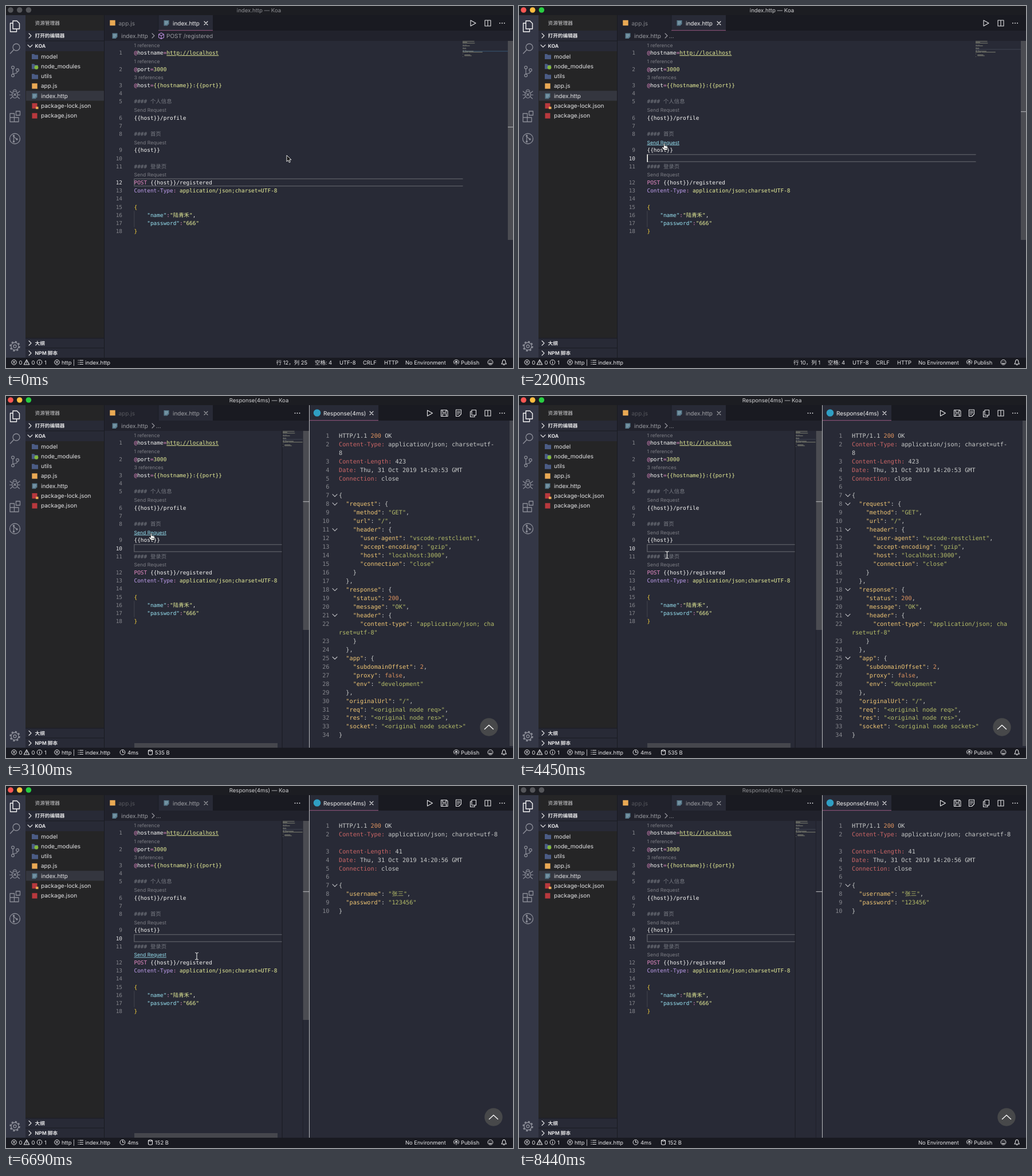
Animation of 885x633 px, one loop 8540 ms. Source, as an HTML page:

```html
<!DOCTYPE html>
<html lang="zh">
<head>
<meta charset="utf-8">
<title>REST request demo</title>
<style>
html, body { margin: 0; width: 100%; height: 100%; overflow: hidden; background: #282a36; }
svg { display: block; width: 100%; height: 100%; }
text { white-space: pre; text-rendering: geometricPrecision; font-family: Inter, "Noto Sans CJK SC", "Noto Sans CJK", sans-serif; }
.code { font-family: "DejaVu Sans Mono", "Noto Sans CJK SC", "Noto Sans CJK", monospace; }
.link { text-decoration: underline; }
.line { fill: none; stroke-width: 1.1; stroke-linejoin: round; stroke-linecap: round; }
</style>
</head>
<body>
<svg id="stage" viewBox="0 0 885 633" preserveAspectRatio="none"></svg>
<script>
const LOOP = 8540;
const SOLO = '0-2650', SPLIT = '2650-8540';
const BG = '#282a36', DARK = '#191a21', SIDE = '#252526', CRUMB = '#21222c', DIM = '#85868c', LIGHT = '#e4e4e6';
const INK = {
  w: '#f6f6f4', p: '#e58bc4', y: '#e7ee98', u: '#e7ee98', v: '#bf9eee', c: '#97e1f1', k: '#777a82', b: '#f7d13d',
  t: '#c9cbca', a: '#f0c674', s: '#b5bd68', n: '#de935f', h: '#cc6666'
};

const esc = s => s.replace(/&/g, '&amp;').replace(/</g, '&lt;').replace(/>/g, '&gt;');
const rect = (x, y, w, h, fill, more = '') => `<rect x="${x}" y="${y}" width="${w}" height="${h}" fill="${fill}" ${more}/>`;
const disc = (x, y, r, fill) => `<circle cx="${x}" cy="${y}" r="${r}" fill="${fill}"/>`;
const line = (d, color = LIGHT, w = 1.1) => `<path class="line" d="${d}" stroke="${color}" style="stroke-width:${w}"/>`;
const ring = (x, y, r, color = LIGHT, w = 1) => `<circle cx="${x}" cy="${y}" r="${r}" fill="none" stroke="${color}" stroke-width="${w}"/>`;
const text = (x, y, s, fill = LIGHT, size = 10, more = '') =>
  `<text x="${x}" y="${y}" fill="${fill}" font-size="${size}" ${more}>${esc(s)}</text>`;
// Shown only inside the given time ranges, e.g. "0-300 8440-8540".
const on = (ranges, s) => `<g data-on="${ranges}">${s}</g>`;

// "~p@~whost" becomes coloured spans.
function code(x, y, s, size) {
  const parts = s.split(/~(\w)/);
  let spans = '';
  for (let i = 1; i < parts.length; i += 2)
    spans += `<tspan fill="${INK[parts[i]]}"${parts[i] === 'u' ? ' class="link"' : ''}>${esc(parts[i + 1])}</tspan>`;
  return `<text class="code" x="${x}" y="${y}" font-size="${size}">${spans}</text>`;
}
const number = (x, y, n, size, fill = DIM) =>
  `<text class="code" x="${x}" y="${y}" font-size="${size}" text-anchor="end" fill="${fill}">${n}</text>`;

// --- small icons ---
const right = (x, y, c = LIGHT) => line(`M${x - 2} ${y - 4}l4 4l-4 4`, c);
const down = (x, y, c = LIGHT) => line(`M${x - 4} ${y - 2}l4 4l4-4`, c);
const cross = (x, y, c = LIGHT, r = 3) => line(`M${x - r} ${y - r}l${2 * r} ${2 * r}m0-${2 * r}l-${2 * r} ${2 * r}`, c);
const dots = (x, y) => [-4, 0, 4].map(d => disc(x + d, y, 0.9, LIGHT)).join('');
const play = x => line(`M${x - 4} 25v10l9-5z`);
const columns = x => line(`M${x - 5} 25h10v10h-10zM${x} 25v10`);
const page = (x, y) => `<path d="M${x - 4.5} ${y - 4.5}h9v6.5l-3 3h-6z" fill="#587a8c"/>` +
  line(`M${x - 2.5} ${y - 2}h5m-5 2h5m-5 2h3`, '#a9c0ca', 0.7);
const folder = y => `<path d="M45 ${y - 4}h4l1.4 1.6h5.6v7.4h-11z" fill="#4b5c85"/>`;
const orange = (x, y) => rect(x - 4.7, y - 4.7, 9.4, 9.4, '#e9a954');
const red = y => rect(45.5, y - 4.7, 9, 9.4, '#b8383d');

function titleBar() {
  const title = (s, c) => text(441.5, 10.6, s, c, 9.6, 'text-anchor="middle"');
  const lights = colors => colors.map((c, i) => disc(8 + 15.7 * i, 7, 4.8, c)).join('');
  const grey = '#55565a', soft = '#8f9094';
  return rect(0, 0, 885, 16, '#1c1d22') +
    on('0-300 8440-8540', lights([grey, grey, grey])) +
    on('300-8440', lights(['#fc5753', '#fdbc40', '#28cd41'])) +
    on('0-300', title('index.http — Koa', soft)) +
    on('300-2650', title('index.http — Koa', '#d2d2d4')) +
    on('2650-8440', title('Response(4ms) — Koa', '#d2d2d4')) +
    on('8440-8540', title('Response(4ms) — Koa', soft));
}

function activityBar() {
  const c = '#8c8e98';
  return rect(0, 16, 34, 599, '#343746') +
    line('M12 26h7l4.500 4.500v9.500h-11.500zM12 30h-4.500v15h11v-5', '#f4f4f4', 1.4) +
    ring(18, 72, 6, c, 1.3) + line('M13.600 76.500L7.500 83', c, 1.5) +
    ring(12, 107.500, 2.4, c, 1.2) + ring(12, 121.500, 2.4, c, 1.2) + ring(20, 112, 2.4, c, 1.2) +
    line('M12 110v9M20 114.500q0 3.500-7 4', c, 1.2) +
    `<ellipse cx="15.500" cy="155" rx="4.800" ry="6" fill="none" stroke="${c}" stroke-width="1.200"/>` +
    line('M12 149q3.500-6 7 0M10.500 152l-3.500-3M10.500 155.500h-4M11 159l-3.500 3M20.500 152l3.500-3M20.500 155.500h4M20 159l3.500 3M13.500 153l4 4m0-4l-4 4', c, 1.1) +
    line('M7 188h7.500v14.500h-7.500zM7 195h15v7.500h-7.500M17.500 184h7v7h-7z', c, 1.3) +
    ring(15.500, 232, 9, c, 1.3) + line('M13.500 226v12M14 229l5 4', c, 1.2) +
    disc(13.500, 227, 1.8, c) + disc(13.500, 237, 1.8, c) + disc(19, 233, 1.8, c) +
    `<circle cx="15.500" cy="595" r="8" fill="none" stroke="${c}" stroke-width="2.400" stroke-dasharray="3.200 3.080"/>` +
    ring(15.500, 595, 6.500, c, 1.3) + ring(15.500, 595, 2.500, c, 1.3);
}

function sideBar() {
  const bold = (y, s) => text(50.500, y + 3.1, s, LIGHT, 8.66, 'font-weight="700"');
  const names = ['model', 'node_modules', 'utils', 'app.js', 'index.http', 'package-lock.json', 'package.json'];
  const row = i => 88 + 17.33 * i;
  return rect(34, 16, 137.500, 599, SIDE) +
    text(50.500, 33, '资源管理器', '#cfcfd2', 8.7) +
    rect(34, 43, 137.500, 36, BG) + rect(34, 60.500, 137.500, 1, DARK) +
    right(42, 52) + bold(52, '打开的编辑器') + down(42, 70) + bold(70, 'KOA') +
    on('0-2800 5500-8540', rect(35, 148.300, 136.500, 17.300, '#34363f')) +
    folder(row(0)) + folder(row(1)) + disc(53, row(1) + 2, 3.4, '#83b93c') + folder(row(2)) +
    orange(50, row(3)) + page(50, row(4)) + red(row(5)) + rect(52, row(5) + 1.500, 4.500, 4, '#e9a954') + red(row(6)) +
    names.map((s, i) => text(61, row(i) + 3.500, s)).join('') +
    rect(34, 580.500, 137.500, 35, BG) + rect(34, 580.500, 137.500, 1, DARK) + rect(34, 597.500, 137.500, 1, DARK) +
    right(42, 589.500) + bold(589.500, '大纲') + right(42, 607) + bold(607, 'NPM 脚本') +
    rect(171, 16, 1, 599, DARK);
}

function tabs() {
  const names = (a, b) => text(196.500, 33.500, 'app.js', a) + text(291, 33.500, 'index.http', b) + cross(349, 30, b);
  const pink = (x, w) => rect(x, 42.200, w, 1, '#96587f');
  return rect(172, 16, 713, 27, DARK) + rect(172, 43, 713, 18, CRUMB) +
    rect(172, 16, 94, 27, CRUMB) + rect(266, 16, 95, 27, BG) +
    rect(265.500, 16, 0.8, 27, DARK) + orange(186, 29.500) + page(280, 29.500) +
    on(SOLO, names('#85868b', '#f2f2f2') + pink(266, 95) + play(815) + columns(841) + dots(866, 30)) +
    on(SPLIT, names('#56575d', '#a1a2a6') + dots(508.500, 30)) +
    page(190, 52) + text(201, 55.500, 'index.http', '#9a9ba1') + right(257, 52, '#9a9ba1') +
    on('0-300', line('M271 47l4.500 2.500v5.500l-4.500 2.500l-4.500-2.500v-5.500zM266.500 49.500l4.500 2.500l4.500-2.500M271 52v5.500', '#b48ad6') +
      text(280, 55.500, 'POST /registered', '#9a9ba1')) +
    on('300-8540', text(262, 55.500, '...', '#9a9ba1'));
}

// --- request editor ---
const ROW = 14.175, SIZE = 9.45;
const source = [
  ['~p@~whostname~p=~uhttp://localhost', '1 reference'],
  ['~p@~wport~p=~y3000', '1 reference'],
  ['~p@~whost~p=~y{{hostname}}:{{port}}', '3 references'],
  [''],
  ['~k#### 个人信息'],
  ['~w{{host}}/profile', 'Send Request'],
  [''],
  ['~k#### 首页'],
  ['~w{{host}}', 'Send Request'],
  [''],
  ['~k#### 登录页'],
  ['~pPOST ~w{{host}}/registered', 'Send Request'],
  ['~vContent-Type~p: ~yapplication/json;charset=UTF-8'],
  [''],
  ['~b{'],
  ['~c    "name"~p:~y"陆青禾"~w,'],
  ['~c    "password"~p:~y"666"'],
  ['~b}']
];
const hover = { 9: [1900, 4000], 12: [4595, 6830] };

function minimap(x, width) {
  let out = '';
  source.forEach(([s], i) => {
    const plain = s.replace(/~\w/g, '');
    const color = s[1] === 'k' ? '#70737c' : '#b7b99c';
    for (const m of plain.matchAll(/\S+/g)) {
      const from = m.index * 0.79;
      if (from < width) out += rect(x + from, 61.300 + i * 1.575, Math.min(m[0].length * 0.79, width - from), 1, color, 'opacity=".6"');
    }
  });
  return out;
}

function editor() {
  const top = r => 60.700 + ROW * r;
  // The current-line frame stays open on the right.
  const current = (r, end) => line(`M${end} ${top(r) + 0.600}H223.800V${top(r) + ROW - 1.100}H${end}`, '#55575f', 1.5);
  const mark = (x, w, y) => rect(x, y, w, 1.3, '#a2a3a7');
  let out = rect(172, 61, 713, 554, BG), lines = '', r = 0;
  source.forEach(([s, lens], i) => {
    const n = i + 1;
    if (lens) {
      const y = top(r++) + 10.900, label = (c, k = '') => text(223.500, y, lens, c, 8.6, k);
      if (hover[n]) {
        const [a, b] = hover[n];
        lines += on(`0-${a} ${b}-${LOOP}`, label('#7d7e85')) + on(`${a}-${b}`, label(INK.c, 'class="link"'));
      } else lines += label('#7d7e85');
    }
    const y = top(r++) + 10.350;
    if (n === 12) lines += on('0-300', number(203, y, n, SIZE, LIGHT)) + on('300-8540', number(203, y, n, SIZE));
    else if (n === 10) lines += on('0-300', number(203, y, n, SIZE)) + on('300-8540', number(203, y, n, SIZE, LIGHT));
    else lines += number(203, y, n, SIZE);
    if (s) lines += code(223.500, y, s, SIZE);
  });
  out += on('0-300', current(17, 797)) + on('300-2650', current(14, 797)) + on(SPLIT, current(14, 482));
  out += rect(223.500, top(21), 0.8, 2 * ROW, '#484a55') + lines;
  out += on('300-880 1320-1762 2200-2650', rect(223.500, top(14) + 0.3, 1.5, 13.500, '#f8f8f2'));
  out += on(SOLO,
    on('0-300', rect(797, 78.500, 79, 1.2, '#35506b')) + on('300-2650', rect(797, 75.300, 79, 1.1, '#3d424f')) +
    minimap(797, 79) + rect(876, 61, 9, 348, '#4b4c52') +
    on('0-300', mark(876, 9, 211)) + on('300-2650', mark(876, 9, 184)));
  out += on(SPLIT,
    rect(482, 61, 47.500, 554, BG) + rect(481.600, 61, 1, 554, '#1a1b22') + rect(483, 75.300, 35, 1.1, '#3d424f') +
    minimap(483, 35) + rect(517.800, 61, 0.8, 554, '#1f2029') +
    on('2650-7570', rect(518.500, 61, 11, 348, '#4b4c52') + rect(224, 607, 250, 8, '#46474d')) +
    mark(518.500, 11, 184));
  return out;
}

// --- response pane; a leading ^ marks a wrapped row ---
const okLine = '~tHTTP/1.1 ~n200 ~tOK';
const head = (key, value) => `~h${key}:~t ${value}`;
const first = [
  okLine, head('Content-Type', 'application/json; charset=utf-'), '^~t8',
  head('Content-Length', '423'), head('Date', 'Thu, 31 Oct 2019 14:20:53 GMT'), head('Connection', 'close'), '',
  '{', '  "request": {', '    "method": "GET",', '    "url": "/",', '    "header": {',
  '      "user-agent": "vscode-restclient",', '      "accept-encoding": "gzip",',
  '      "host": "localhost:3000",', '      "connection": "close"', '    }', '  },',
  '  "response": {', '    "status": 200,', '    "message": "OK",', '    "header": {',
  '      "content-type": "application/json; cha', '^~srset=utf-8"', '    }', '  },',
  '  "app": {', '    "subdomainOffset": 2,', '    "proxy": false,', '    "env": "development"', '  },',
  '  "originalUrl": "/",', '  "req": "<original node req>",', '  "res": "<original node res>",',
  '  "socket": "<original node socket>"', '}'
];
const second = [
  okLine, head('Content-Type', 'application/json; charset=utf-8'), '^',
  head('Content-Length', '41'), head('Date', 'Thu, 31 Oct 2019 14:20:56 GMT'), head('Connection', 'close'), '',
  '{', '  "username": "张三",', '  "password": "123456"', '}'
];
const paint = s => s.includes('~') ? s : '~t' + s.replace(/"[^"]*"?|\bfalse\b|\b\d+\b/g, (m, at, all) =>
  `~${m[0] !== '"' ? 'n' : all[at + m.length] === ':' ? 'a' : 's'}${m}~t`);

function response(rows, buttonX) {
  let n = 0;
  return rows.map((s, i) => {
    const y = 72.700 + 14.963 * i, wrapped = s[0] === '^';
    if (wrapped) s = s.slice(1);
    return (wrapped ? '' : number(564.500, y, ++n, 10.24)) +
      (s.endsWith('{') ? down(574, y - 3.500, '#bfc0c4') : '') +
      (s ? code(581, y, paint(s), 10.24) : '');
  }).join('') + disc(buttonX, 579, 15.700, '#47484a') + line(`M${buttonX - 7.500} 582.500l7.500-7l7.500 7`, '#f4f4f4', 1.5);
}

function responsePane() {
  const note = x => line(`M${x - 4.500} 24h9v7.500l-4 4h-5zM${x - 2.500} 27h5m-5 2.500h5m-5 2.500h2.500`);
  return on(SPLIT,
    rect(530, 16, 355, 27, DARK) + rect(530, 43, 355, 572, BG) + rect(530, 16, 120, 27, BG) +
    rect(530, 42.200, 120, 1, '#96587f') + disc(543, 29.500, 6.3, '#2f9fc4') +
    text(554, 33.500, 'Response(4ms)', '#f2f2f2') + cross(638, 30) + play(739.500) +
    line('M759.500 24.500h9.500l2 2v9h-11.500zM762 24.500v4h6v-4M762 35.500v-4.500h6.500v4.500') + note(790) +
    line('M813 24.500h7.500v9h-7.500zM813 27h-2.500v9.500h7.500v-3') + columns(841) + dots(866, 30) +
    on('3100-5650', response(first, 843) + rect(879, 43, 6, 569, '#44464d')) +
    on('5650-8540', response(second, 851)) +
    rect(529, 16, 1, 599, '#b9babd'));
}

function statusBar() {
  const s = (x, str, more) => text(x, 626.500, str, '#e6e6e8', 9.4, more);
  const failed = x => ring(x, 623, 4.3) + cross(x, 623, LIGHT, 1.6);
  const full = s(539, '空格: 4') + s(582, 'UTF-8') + s(623, 'CRLF') + s(660, 'HTTP');
  const place = str => s(526, str, 'text-anchor="end"');
  return rect(0, 615, 885, 18, DARK) +
    failed(14) + s(22.500, '0') + line('M36 618.500l4.700 8.500h-9.400zM36 621.500v2.500m0 1.500v.1') + s(44.500, '0') +
    ring(58.500, 623, 4.3) + line('M58.500 622.500v2.500m0-4.500v.1') + s(67, '1') +
    failed(89) + s(97, 'http |') + line('M126 619.500h.5m2 0h6M126 623h.5m2 0h6M126 626.500h.5m2 0h6') + s(138, 'index.http') +
    on('0-300', place('行 12，列 25')) + on('300-2800', place('行 10，列 1')) + on('0-2800', full) +
    on('2800-8540', ring(203.500, 623, 4.4) + line('M203.500 620v3h2.500') + s(212, '4ms') +
      line('M248.500 620v6.500q3.500 2 7 0v-6.500M248.500 620q3.500 2 7 0q-3.500-2.500-7 0')) +
    on('2800-5500', s(260, '535 B')) + on('5500-8540', s(260, '152 B')) +
    on('0-2800 5500-8540', s(697, 'No Environment')) +
    disc(786, 622, 1.3, LIGHT) + line('M786 623.500v4M783 626q-3.500-4 0-6.500q3-2 6 0q3.500 2.500 0 6.500M784 624.500q-1.500-3 2-3.500q3.500.5 2 3.500', LIGHT, 0.9) +
    s(794, 'Publish') +
    ring(845.500, 623, 4.4) + line('M843.500 624.500q2 2 4 0M844 621.500v.1m3 0v.1') +
    line('M865 626q1.500-1.500 1.500-4q.5-3.500 2.700-3.500t2.700 3.500q0 2.500 1.500 4zM868.200 627.500h2');
}

// --- pointer: hot spot at 0,0 ---
const pointer = `<g id="pointer">
  <path id="arrow" d="M0 0v11l2.600-2.400l1.700 4l1.900-.8l-1.700-3.900h3.500z" fill="#111" stroke="#fff" stroke-width=".9"/>
  <path id="beam" class="line" d="M-2.500-6q2 0 2.500 1.200q.5-1.200 2.500-1.200M0-4.800v9.600M-2.500 6q2 0 2.500-1.200q.5 1.200 2.500 1.200" stroke="#e8e8e8"/>
  <g id="hand" stroke="#111" stroke-width=".7" stroke-linejoin="round">
    <path d="M-1 .6q1-1.600 2 0v3.400q1.200-.8 1.800.3q1.200-.6 1.700.5q1.500-.4 1.500 1.100v2.300l-1 3.300h-5.200l-3.600-4.400q-.4-1.600 1.300-1.200l1.500 1.300z" fill="#fff"/>
    <path d="M1.200 7.500v2M2.800 7.500v2M4.400 7.500v2" fill="none"/>
  </g>
</g>`;
const home = [490, 261];
// [start, end, steps, x, y]
const legs = [
  [300, 730, 3, 242, 134],
  [730, 1320, 4, 249, 216],
  [1320, 2200, 6, 253.5, 240.5],
  [3850, 4750, 6, 261, 296.5],
  [6540, 6690, 1, 333, 297.5],
  [6690, 7130, 3, 1137, 782]
];

function pointerAt(t) {
  let [x, y] = home;
  for (const [a, b, n, tx, ty] of legs) {
    if (t < a) break;
    const k = Math.min(1, Math.floor((t - a) / (b - a) * n + 0.03) / n);
    x += (tx - x) * k;
    y += (ty - y) * k;
  }
  return [x, y];
}

const $ = id => document.getElementById(id);
$('stage').innerHTML = editor() + tabs() + responsePane() + sideBar() + activityBar() + statusBar() + titleBar() + pointer;
const parts = [...document.querySelectorAll('[data-on]')].map(el =>
  [el, el.dataset.on.split(' ').map(r => r.split('-').map(Number))]);
const within = (t, [a, b]) => t >= a && t < b;
const show = (el, yes) => el.style.display = yes ? '' : 'none';

function update(t) {
  for (const [el, ranges] of parts) show(el, ranges.some(r => within(t, r)));
  const [x, y] = pointerAt(t);
  const linked = t < 6680 && Object.values(hover).some(r => within(t, r));
  const kind = linked ? 'hand' : t < 300 || t > 6830 ? 'arrow' : 'beam';
  for (const id of ['arrow', 'beam', 'hand']) show($(id), id === kind);
  $('pointer').setAttribute('transform', `translate(${x} ${y})`);
}

function tick() {
  update(performance.now() % LOOP);
  requestAnimationFrame(tick);
}
tick();
</script>
</body>
</html>
```
